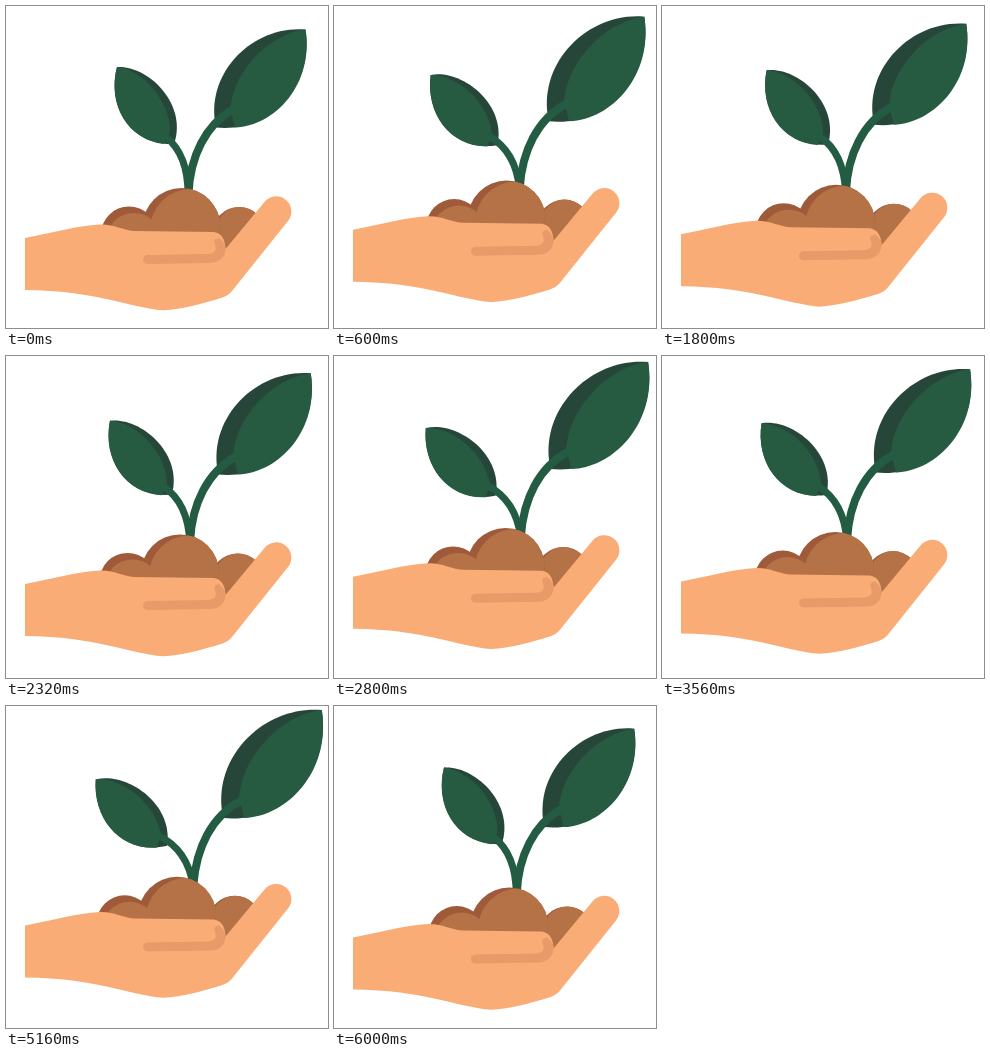
These frames come from a looping animation (322x322 px, 6.04 s). An HTML page:

```html
<!DOCTYPE html>
<html lang="en">
<head>
<meta charset="utf-8">
<title>Seedling in hand</title>
<style>
  html, body { margin: 0; height: 100%; overflow: hidden; background: #fff; }
  svg { display: block; width: 100%; height: 100%; }
  .dark { fill: #27463a; }
  .leaf { fill: #265a41; }
  .stem { fill: none; stroke: #235b43; stroke-linecap: round; }
  .shade { fill: #9f5a39; }
  .soil { fill: #b57246; }
  .skin { fill: #f9ac75; }
  .fold { fill: #e89b68; }
</style>
</head>
<body>
<svg viewBox="0 0 322 322">
  <defs>
    <clipPath id="midClip"><circle cx="175.500" cy="221" r="39"/></clipPath>
    <clipPath id="rightClip"><circle cx="233" cy="228" r="27"/></clipPath>
  </defs>

  <g id="leftLeaf">
    <path class="dark" d="M111 61C142 59 182 98 168 138C124 140 101 100 111 61Z"/>
    <path class="leaf" d="M111 61C136 64 164 93 164 126L158 138C122 134 101 99 111 61Z"/>
  </g>
  <g id="rightLeaf">
    <path class="dark" d="M299.500 23.500C246 19 198 68 210 121.500C264 127 308 80 299.500 23.500Z"/>
    <path class="leaf" d="M299.500 23.500C261 28 226 68 224.500 103L229 121.500C269 120 308 78 299.500 23.500Z"/>
  </g>
  <path id="leftStem" class="stem" stroke-width="7"/>
  <path id="rightStem" class="stem" stroke-width="8"/>

  <g id="soil">
    <circle class="shade" cx="123" cy="228.500" r="28"/>
    <circle class="shade" cx="233" cy="228" r="27"/>
    <circle class="soil" cx="236" cy="228.500" r="28" clip-path="url(#rightClip)"/>
    <circle class="shade" cx="175.500" cy="221" r="39"/>
    <circle class="soil" cx="128" cy="235" r="28"/>
    <circle class="soil" cx="185" cy="224" r="41" clip-path="url(#midClip)"/>
  </g>

  <g id="hand">
    <path class="skin" d="M19 232C45 227 70 220 94 218.500C108 218 116 224 128 225L208 226Q219 228 219.500 243L258.500 196A15 15 0 0 1 282 215L226 285Q222 290 215 292C195 298 177 303 157 304.300C125 302 90 284.500 19 284Z"/>
    <path class="fold" d="M141.500 249L202 248Q212 247 209 239Q206 233 213 232Q222 239 219 247Q216 256 205 257L141.500 258A4.500 4.500 0 0 1 141.500 249Z"/>
  </g>
</svg>
<script>
const LOOP = 6040;
// Times (ms) at which the sway is alternately lowest and highest
const turns = [0, 1052, 2052, 3020, 4012, 5020, LOOP];
const part = id => document.getElementById(id);
const set = (id, name, value) => part(id).setAttribute(name, value);

function lift(t) {
  const i = turns.findIndex((end, k) => k && t < end) - 1;
  const p = (t - turns[i]) / (turns[i + 1] - turns[i]);
  return i % 2 ? 1 - p : p;
}

const move = (id, x, y) => set(id, 'transform', `translate(${x} ${y})`);

// Shift, turn and grow a leaf about its base point
function pose(id, [x, y], dx, dy, angle, scale) {
  set(id, 'transform',
    `translate(${x + dx} ${y + dy}) rotate(${angle}) scale(${scale}) translate(${-x} ${-y})`);
}

function curve(id, low, high, u) {
  const p = low.map((v, i) => v + (high[i] - v) * u);
  set(id, 'd', `M${p.slice(0, 2)}C${p.slice(2)}`);
}

function draw(now) {
  const u = lift(now % LOOP);
  move('hand', 0, -14.5 * u);
  move('soil', -5 * u, -13 * u);
  pose('leftLeaf', [168, 138], -8 * u, 2 * u, -12.3 * u, 1 + 0.02 * u);
  pose('rightLeaf', [211, 121], 8.5 * u, -11 * u, 0, 1 + 0.118 * u);
  curve('leftStem', [182, 188, 182, 163, 175, 143, 160, 131],
                    [188, 179, 184, 155, 171, 138, 151, 129], u);
  curve('rightStem', [182.5, 188, 184, 150, 200, 119, 226, 104],
                     [188, 179, 191, 140, 207, 108, 237, 93], u);
  requestAnimationFrame(draw);
}
draw(performance.now());
</script>
</body>
</html>
```
